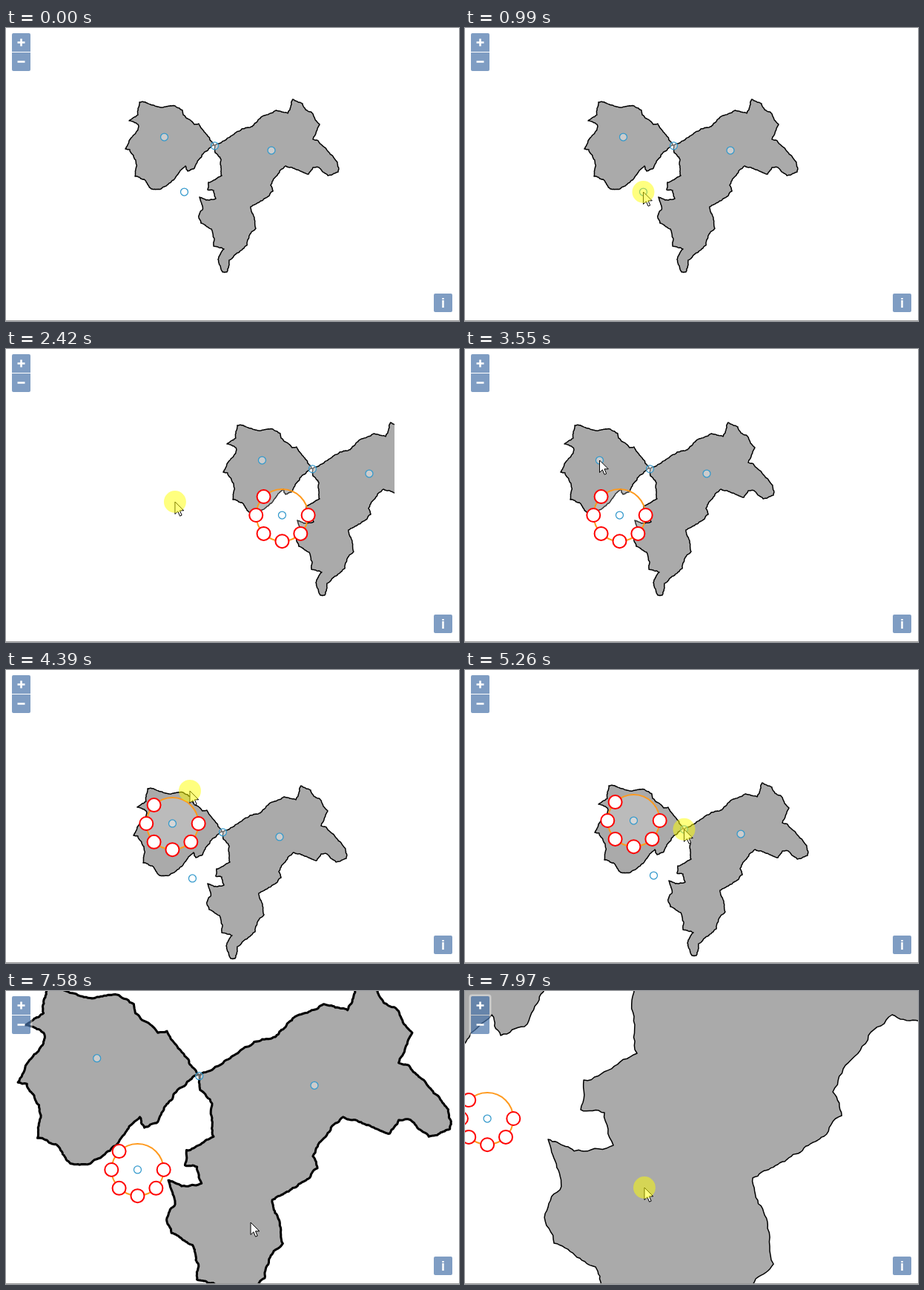
An HTML page for the animation above (7990 ms loop, 611 by 395 pixels).

```html
<!DOCTYPE html>
<html lang="en">
<head>
<meta charset="utf-8">
<title>Map interaction</title>
<style>
  html, body { margin: 0; width: 100%; height: 100%; overflow: hidden; background: #fff; }
  svg { display: block; width: 611px; height: 395px; }
  text { font: bold 18px "Liberation Sans", Arial, sans-serif; fill: #fff; text-anchor: middle; }
</style>
</head>
<body>
<svg viewBox="0 0 611 395">
  <clipPath id="clip"><rect id="clipRect" height="395"/></clipPath>
  <g id="view" clip-path="url(#clip)">
    <g id="land" fill="#aaa" stroke="#000" stroke-linejoin="round"></g>
  </g>
  <g id="menu">
    <circle r="35" fill="#fff" fill-opacity=".2" stroke="#ff9a1e" stroke-width="2"/>
  </g>
  <g id="markers" fill="#fff" fill-opacity=".4" stroke="#39c" stroke-width="1.25"></g>
  <g id="controls">
    <rect x="5.5" y="4.5" width="30" height="56" rx="4" fill="#fff" fill-opacity=".4"/>
    <g fill="#003c88" fill-opacity=".5">
      <path d="M8 32V9q0-2 2-2h21q2 0 2 2v23z"/>
      <path d="M8 33h25v23q0 2-2 2H10q-2 0-2-2z"/>
      <rect x="577" y="358" width="25" height="25" rx="2"/>
    </g>
    <path d="M15.5 19.5h10M20.5 14.5v10M15.5 45.5h10" stroke="#fff" stroke-width="2.6"/>
    <text x="589.5" y="377">i</text>
  </g>
  <rect y="394" width="611" height="1" fill="#999"/>
  <path id="cursor" d="M0 0v16.5l3.900-3.700 2.700 6.400 2.600-1.100-2.700-6.300h5.300z" fill="#fff" stroke="#000"/>
  <circle id="press" r="15" fill="#ff0" fill-opacity=".5"/>
</svg>
<script>
const LOOP = 7990;
const WIDTH = 611;
const $ = id => document.getElementById(id);
const make = (tag, attrs, parent) => {
  const el = document.createElementNS('http://www.w3.org/2000/svg', tag);
  for (const k in attrs) el.setAttribute(k, attrs[k]);
  return parent.appendChild(el);
};
const place = (el, [x, y]) => el.setAttribute('transform', `translate(${x} ${y})`);
const show = (el, on) => el.setAttribute('visibility', on ? 'visible' : 'hidden');
const mix = (a, b, p) => a.map((v, i) => v + (b[i] - v) * p);
const clamp = p => Math.min(1, Math.max(0, p));
const smooth = p => p * p * (3 - 2 * p);

// Corners of the two areas; the coast between them is grown by midpoint displacement.
const corners = [
  `180,100 188,100 209,107 228,105 238,111 239,117 254,130 260,129 281,158 267,168 258,181
   253,190 245,193 242,186 226,205 209,217 196,217 186,204 174,200 175,178 167,164 161,163
   166,152 178,137 178,130 166,125 178,117`,
  `282,158 302,147 318,136 329,134 348,118 364,111 380,115 387,96 400,102 404,110 411,113
   423,130 414,150 421,152 447,181 448,194 434,199 422,188 414,188 408,197 377,186 369,193
   357,212 360,220 354,227 330,241 335,258 337,270 331,275 325,293 301,313 298,329 292,329
   286,312 294,298 280,294 281,284 277,271 263,263 260,253 265,245 261,228 273,232 283,230
   280,219 272,218 273,208 291,199 290,177 282,168`
];

let seed = 7;
const noise = () => (seed = seed * 16807 % 2147483647) / 2147483647 - .5;

function grow(a, b) {
  const dx = b[0] - a[0], dy = b[1] - a[1], len = Math.hypot(dx, dy);
  if (len < 1.6) return [a];
  const off = noise() * .25 * Math.min(len, 7) / len;
  const mid = [a[0] + dx / 2 - dy * off, a[1] + dy / 2 + dx * off];
  return [...grow(a, mid), ...grow(mid, b)];
}

for (const text of corners) {
  const pts = text.split(/\s+/).map(p => p.split(',').map(Number));
  const coast = pts.flatMap((p, i) => grow(p, pts[(i + 1) % pts.length]));
  make('path', { d: `M${coast.map(p => p.map(v => v.toFixed(2))).join('L')}Z` }, $('land'));
}

const sites = { A: [213.5, 147], B: [281.5, 158.8], C: [358, 165], D: [240.5, 221] };
const markers = Object.values(sites).map(pos =>
  ({ pos, el: make('circle', { r: 5 }, $('markers')) }));

for (let i = 0; i < 6; i++) {
  const a = i * Math.PI / 4;
  make('circle', { cx: 35.2 * Math.cos(a), cy: 35.2 * Math.sin(a), r: 9,
    fill: '#fff', stroke: '#f00', 'stroke-width': 2 }, $('menu'));
}

// A position that rests between eased moves.
class Track {
  constructor(...start) { this.start = this.end = start; this.moves = []; }
  to(from, until, x, y) {
    this.end = [x, y];
    this.moves.push({ from, until, goal: this.end });
  }
  by(from, until, dx, dy) { this.to(from, until, this.end[0] + dx, this.end[1] + dy); }
  at(t) {
    return this.moves.filter(m => m.from <= t).reduce((pos, { from, until, goal }) =>
      mix(pos, goal, smooth(clamp((t - from) / (until - from || 1)))), this.start);
  }
}

const pan = new Track(0, 0);
const hand = new Track(341, 400);
const presses = [], menus = [];
const CLICK = 120;

function drag(from, until, dx, dy) {
  hand.by(from, until, dx, dy);
  pan.by(from, until, dx, dy);
  presses.push([from, until]);
}

function click(from, until, site, time) {
  const [x, y] = sites[site], [px, py] = pan.end;
  hand.to(from, until, x + px, y + py);
  presses.push([time, time + CLICK]);
  menus.push({ time: time + CLICK, site });
}

const swipe = { from: 2320, until: 2546, rest: 2800 };
const zoom = { from: 7523, length: 185, x: 329.3, y: 312 };

click(140, 930, 'D', 970);
hand.to(1100, 1500, 348, 218);
drag(1680, 1860, 205, 0);
drag(2020, 2140, 14, 3);
hand.to(swipe.from - 1, swipe.from, 315, 206);
drag(swipe.from, swipe.until, -207, 0);
pan.by(swipe.until, swipe.rest, -44, 0);
hand.to(2700, 3070, 268, 200);
click(3130, 3540, 'A', 3570);
hand.to(3700, 4000, 205, 106);
drag(4020, 4460, 46, 61);
pan.by(4650, 4800, 0, -8);
click(4650, 5200, 'B', 5260);
click(5480, 5890, 'C', 6050);
click(6180, 6440, 'D', 6770);
hand.to(6900, 7400, 330, 312);
hand.to(7700, 7930, 242, 265);
presses.push([7940, LOOP]);

function draw(t) {
  const shift = pan.at(t);
  const p = clamp((t - zoom.from) / zoom.length);
  const scale = 1 / (1 - .75 * (1 - (1 - p) ** 3));
  const origin = mix([zoom.x, zoom.y], shift, scale);
  const project = pos => pos.map((v, i) => origin[i] + v * scale);

  // The land is stretched as drawn while zooming, then redrawn sharp and thin.
  $('land').setAttribute('transform', `translate(${origin}) scale(${scale})`);
  $('land').setAttribute('stroke-width', p === 1 ? 1.5 / scale : 1.5);
  $('view').style.filter = p > 0 && p < 1 ? 'blur(.7px)' : 'none';

  // A drag to the left uncovers the part not drawn yet.
  const swiping = t >= swipe.from && t < swipe.rest;
  $('clipRect').setAttribute('width', WIDTH - (swiping ? pan.at(swipe.from)[0] - shift[0] : 0));

  for (const m of markers) place(m.el, project(m.pos));
  const open = menus.filter(m => m.time <= t).pop();
  show($('menu'), open);
  if (open) place($('menu'), project(sites[open.site]));

  const tip = hand.at(t);
  place($('cursor'), tip);
  place($('press'), tip);
  show($('press'), presses.some(([from, until]) => t >= from && t < until));
}

function tick() {
  draw(performance.now() % LOOP);
  requestAnimationFrame(tick);
}
tick();
</script>
</body>
</html>
```
